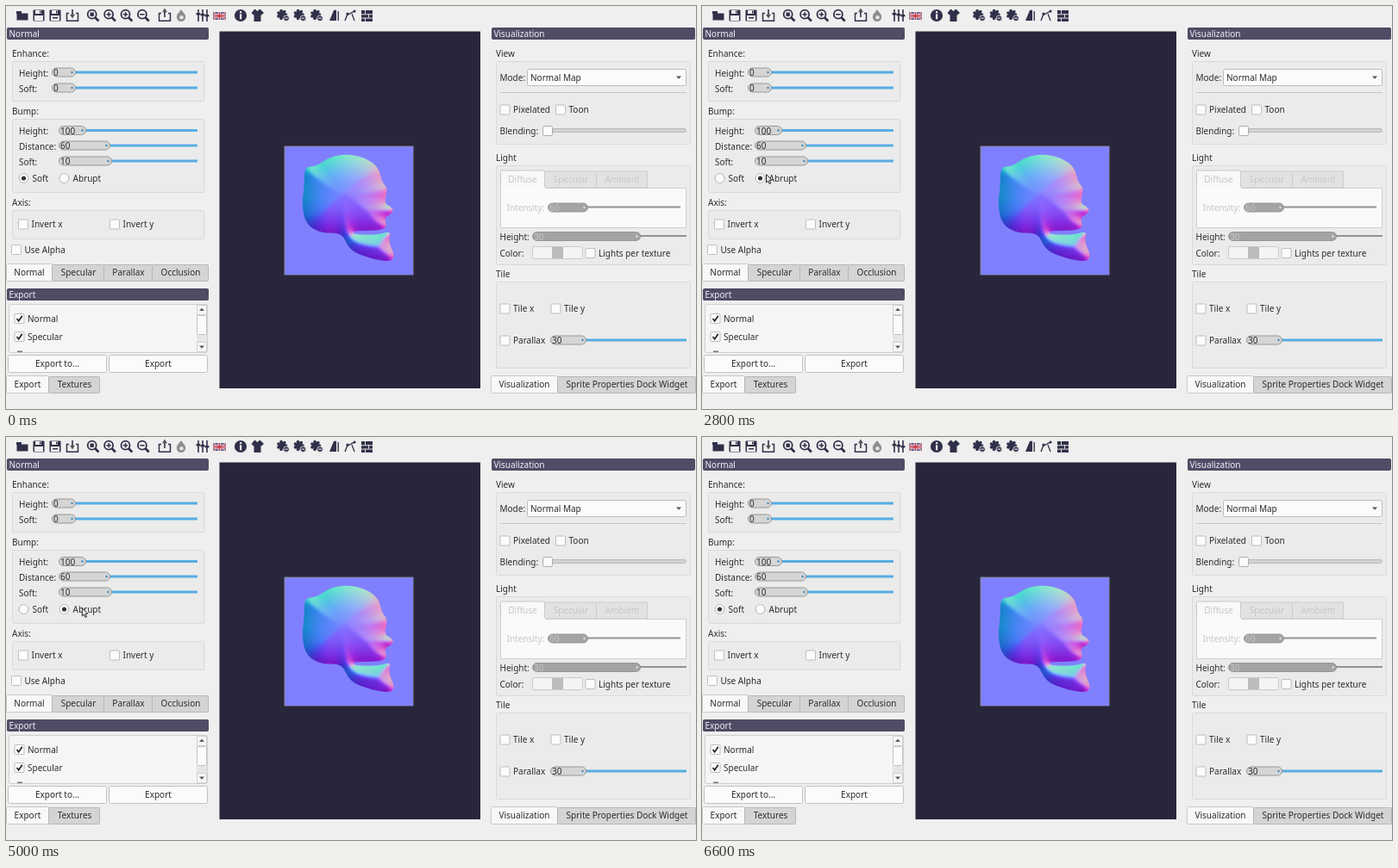
These frames come from a looping animation (800x468 px, 7.4 s). An HTML page with a canvas:

```html
<!DOCTYPE html>
<html lang="en">
<head>
<meta charset="utf-8">
<title>Normal map editor</title>
<style>
html, body { margin: 0; width: 100%; height: 100%; overflow: hidden; background: #efefef; }
canvas { display: block; }
</style>
</head>
<body>
<canvas id="stage" width="800" height="468"></canvas>
<script>
const LOOP = 7400, STEP = 100;
const INK = '#2c2c30', ICON = '#30304a', BLUE = '#57ade3', DIM = '#c6c6c6', BACK = '#efefef';
const stage = document.getElementById('stage').getContext('2d');
let g = stage;

// ---------- basic helpers ----------
function box(x, y, w, h, fill, line, r = 0) {
  g.beginPath();
  g.roundRect(x + .5, y + .5, w - 1, h - 1, r);
  if (fill) { g.fillStyle = fill; g.fill(); }
  if (line) { g.strokeStyle = line; g.lineWidth = 1; g.stroke(); }
}
function rect(x, y, w, h, fill) { g.fillStyle = fill; g.fillRect(x, y, w, h); }
function text(s, x, y, color = INK, align = 'left') {
  g.font = '10px "Noto Sans", sans-serif';
  g.textAlign = align;
  g.fillStyle = color;
  g.fillText(s, x, y + 3.6);
}
function trace(pts) {
  g.beginPath();
  pts.forEach(([x, y]) => g.lineTo(x, y));
}
function poly(pts, fill, line) {
  trace(pts);
  g.closePath();
  g.fillStyle = fill; g.fill();
  if (line) { g.strokeStyle = line; g.lineWidth = 1; g.stroke(); }
}
function line(pts, color, width = 1) {
  trace(pts);
  g.strokeStyle = color; g.lineWidth = width; g.stroke();
}
function disc(x, y, r, fill, stroke, width = 1) {
  g.beginPath(); g.arc(x, y, r, 0, 7);
  g.fillStyle = fill; g.fill();
  if (stroke) { g.strokeStyle = stroke; g.lineWidth = width; g.stroke(); }
}

// ---------- widgets ----------
function title(s, x, y, w) {
  box(x + 1, y + 1, w - 2, 14, '#4f4d66', '#4a4861', 1);
  text(s, x + 3.5, y + 8, '#f2f2f5');
}
function group(name, x, y, r, b) {
  text(name, x, y - 9);
  box(x, y, r - x, b - y, '#ebebeb', '#d9d9d9', 1);
}
function slider(value, x, knob, end, y, on = true) {
  rect(knob - 2, y - 1.5, end - knob + 2, on ? 3 : 2, on ? BLUE : '#929292');
  box(x, y - 5.5, knob - x, 11, on ? '#d5d5d5' : '#a4a4a4', '#979797', 5);
  text(value, x + 2, y + .7, on ? INK : '#c4c4c4');
  disc(knob - 4.5, y, 1.2, on ? '#3f87b8' : '#dedede');
}
function field(label, value, x, knob, y) {
  text(label, 15, y + 1);
  slider(value, x, knob, 222, y);
}
function check(s, x, y, on) {
  box(x, y - 6, 12, 12, '#fcfcfc', '#bdbdbd', 1);
  if (on) line([[x + 3, y], [x + 5.2, y + 2.8], [x + 9.3, y - 3.3]], '#222', 1.7);
  text(s, x + 15.5, y);
}
function radio(s, x, y, on) {
  disc(x, y, 5.4, '#fcfcfc', '#b5b5b5');
  if (on) disc(x, y, 2.6, '#333338');
  text(s, x + 10, y);
}
function tabs(names, x, y, color = INK) {
  const dim = color !== INK;
  names.forEach((s, i) => {
    text('', 0, 0);
    const w = Math.round(g.measureText(s).width + 19);
    if (i) box(x - 1, y + 1, w + 1, 20, dim ? '#e2e2e2' : '#d4d4d4', dim ? '#ccc' : '#b7b7b7', 1);
    else box(x, y, w, 21, '#f8f8f8', '#c8c8c8', 1);
    text(s, x + w / 2, y + 10.5, color, 'center');
    x += w;
  });
}
function button(s, x) {
  box(x, 405, 115, 21, '#fbfbfb', '#c1c1c1', 2);
  text(s, x + 57.5, 415.3, INK, 'center');
}
const arrow = (x, y, d) => poly([[x - 3, y - d * 1.5], [x + 3, y - d * 1.5], [x, y + d * 1.7]], '#555');

// ---------- toolbar ----------
function disk(x) {
  box(x - 7, 4, 14, 14, ICON, null, 1);
  rect(x - 4, 5, 7, 4, BACK);
  rect(x + 1, 5.5, 1.5, 3, ICON);
  rect(x - 5, 11, 10, 6, BACK);
}
function lens(x, mark) {
  line([[x + 2, 13], [x + 6.5, 17.5]], ICON, 2.6);
  disc(x - 1.3, 9.7, 5, BACK, ICON, 1.8);
  if (mark === 'fit') return rect(x - 3.5, 7.5, 4.4, 4.4, ICON);
  rect(x - 4, 9, 5.4, 1.5, ICON);
  if (mark !== '-') rect(x - 2, 7, 1.5, 5.4, ICON);
}
function tray(x, tip) {
  line([[x - 4, 8.5], [x - 6.5, 8.5], [x - 6.5, 17.2], [x + 6.5, 17.2], [x + 6.5, 8.5], [x + 4, 8.5]], ICON, 1.5);
  rect(x - .8, 4, 1.6, 9, ICON);
  arrow(x, tip > 8 ? 12 : 5, tip > 8 ? 1.5 : -1.5);
}
function splat(x) {
  for (let i = 0; i < 7; i++) disc(x - 1 + 4.5 * Math.cos(i * .9), 10 + 4.5 * Math.sin(i * .9), 1.8, ICON);
  disc(x - 1, 10, 4.2, ICON);
  disc(x + 4, 14.2, 3.3, ICON, BACK, .8);
  rect(x + 2.2, 13.6, 3.6, 1.1, BACK);
}
function flag(x, y) {
  rect(x, y, 15, 9, '#34437e');
  for (const [color, w] of [['#f4f4f4', 1.8], ['#c63c50', .9]]) {
    line([[x, y], [x + 15, y + 9]], color, w);
    line([[x + 15, y], [x, y + 9]], color, w);
    rect(x, y + 4.5 - w, 15, 2 * w, color);
    rect(x + 7.5 - w, y, 2 * w, 9, color);
  }
}
function toolbar() {
  rect(12, 6, 6, 3, ICON);
  box(12, 8, 14, 9, ICON);
  disk(38); disk(57);
  rect(54, 13, 6, 1.5, ICON);
  tray(77, 14);
  ['fit', '1', '+', '-'].forEach((mark, i) => lens(101 + i * 19.4, mark));
  tray(184, 3);
  disc(203, 12.8, 5.2, '#8d8d92');
  poly([[198.5, 10], [203, 4], [207.5, 10]], '#8d8d92');
  disc(203.5, 13.3, 2.2, '#e7e7e7');
  for (let i = -1; i < 2; i++) {
    rect(227.2 + i * 5, 4, 1.6, 14, ICON);
    rect(225.6 + i * 5, 9 + i, 4.8, 2.4, ICON);
  }
  flag(240, 7);
  disc(272, 11, 7.1, ICON);
  rect(271, 6, 2.2, 2.2, BACK); rect(271, 9.3, 2.2, 6, BACK);
  rect(287.5, 4.5, 8, 13.5, ICON);
  poly([[288, 4], [295, 4], [299, 8], [296, 10.5], [287, 10.5], [284.5, 8]], ICON);
  disc(291.5, 4, 1.8, BACK);
  for (let i = 0; i < 3; i++) splat(321 + i * 19.5);
  poly([[375, 17], [380, 5], [383, 4.5], [383, 17]], ICON);
  rect(384.5, 6, 1.4, 11, ICON);
  line([[393, 17], [395.5, 10.5], [404, 6]], ICON, 1.4);
  disc(396, 9, 1.6, ICON); disc(404, 6, 1.6, ICON);
  line([[401, 9], [404, 17]], ICON, 1.3);
  rect(412, 5, 13, 13, ICON);
  for (let r = 0; r < 3; r++) {
    if (r) rect(412, 5 + r * 4.3, 13, .9, BACK);
    rect(416 + (r % 2) * 4, 5 + r * 4.3, .9, 4.3, BACK);
  }
}

// ---------- panels ----------
function leftPanel() {
  title('Normal', 0, 24, 236);
  group('Enhance:', 7, 64, 230, 111);
  field('Height:', '0', 53, 81, 77);
  field('Soft:', '0', 53, 81, 95);
  group('Bump:', 7, 131, 230, 217);
  field('Height:', '100', 61, 93, 144.5);
  field('Distance:', '60', 61, 121, 162);
  field('Soft:', '10', 61, 123, 180);
  group('Axis:', 7, 237, 230, 271);
  check('Invert x', 14, 253.5); check('Invert y', 120, 253.5);
  check('Use Alpha', 6, 283);
  tabs(['Normal', 'Specular', 'Parallax', 'Occlusion'], 0, 299);

  title('Export', 0, 327, 236);
  box(3, 346, 231, 57, '#f5f5f5', '#cfcfcf', 1);
  check('Normal', 9.5, 363, true);
  check('Specular', 9.5, 384, true);
  rect(13, 400.5, 6, 1.5, '#77777a');
  rect(221, 347, 12, 55, '#e6e6e6');
  box(221, 347, 12, 12, '#f6f6f6', '#d0d0d0');
  box(221, 359, 12, 23, '#fafafa', '#c4c4c4', 1);
  box(221, 390, 12, 12, '#f6f6f6', '#d0d0d0');
  arrow(227, 352.5, -1); arrow(227, 396, 1);
  button('Export to...', 2); button('Export', 119);
  tabs(['Export', 'Textures'], 0, 429);
}
function rightPanel() {
  title('Visualization', 562, 24, 238);
  group('View', 568, 64, 794, 161);
  text('Mode:', 572.5, 83);
  box(604, 73, 185, 20, '#fbfbfb', '#bcbcbc', 2);
  text('Normal Map', 608, 83); arrow(780, 83, 1);
  rect(573, 100, 216, 1, '#c6c6c6');
  check('Pixelated', 572.5, 120.5); check('Toon', 637, 120.5);
  text('Blending:', 572.5, 145.5);
  box(628, 142, 161, 5, '#d2d2d2', '#bababa', 2);
  box(622, 139, 12, 12, '#fcfcfc', '#aaa', 2);

  group('Light', 568, 185, 794, 301);
  box(573, 211, 216, 47, '#fafafa', '#cfcfcf');
  tabs(['Diffuse', 'Specular', 'Ambient'], 573, 190.5, DIM);
  rect(574, 210, 51, 3, '#fafafa');
  text('Intensity:', 580.5, 234.5, DIM);
  slider('60', 628, 675, 782, 234, false);
  text('Height:', 572.5, 268.5);
  slider('30', 610, 736, 789, 267.5, false);
  text('Color:', 572.5, 287);
  box(610, 279, 59, 15, '#f4f4f4', '#c9c9c9', 2);
  rect(633, 280, 13, 13, '#bcbcbc');
  check('Lights per texture', 671.5, 287);

  group('Tile', 568, 320, 794, 421);
  check('Tile x', 572.5, 351.5); check('Tile y', 631.5, 351.5);
  check('Parallax', 572.5, 388.5);
  slider('30', 631, 673, 789, 388);
  tabs(['Visualization', 'Sprite Properties Dock Widget'], 562, 429);
}

// ---------- skull, lit as a normal map ----------
const OX = 323, OY = 163, SIZE = 150;
// control points, rounded off by quadratic curves
const knots = [
  [346, 187], [360, 186], [374, 176], [394, 171.5], [416, 176], [432, 187], [436, 205],
  [443, 212], [438, 229], [448, 234], [449, 240], [438, 246], [442, 256], [434, 261],
  [403, 261], [403, 265], [430, 266], [447, 261], [443, 273], [451, 290], [446, 297],
  [425, 294], [398, 284], [390, 263], [366, 264], [348, 254], [343, 232], [346, 206]
];
const skull = knots.flatMap((p, i) => {
  const a = knots.at(i - 1), b = knots[(i + 1) % knots.length];
  return [0, .25, .5, .75].map(t => [0, 1].map(k =>
    (1 - t) ** 2 * (a[k] + p[k]) / 2 + 2 * t * (1 - t) * p[k] + t * t * (p[k] + b[k]) / 2 - [OX, OY][k]));
});

// signed distance to the outline, positive inside
function depth(x, y) {
  let best = 1e9, hit = false;
  skull.forEach(([ax, ay], i) => {
    const [bx, by] = skull[(i + 1) % skull.length], dx = bx - ax, dy = by - ay;
    const t = Math.max(0, Math.min(1, ((x - ax) * dx + (y - ay) * dy) / (dx * dx + dy * dy)));
    best = Math.min(best, Math.hypot(x - ax - t * dx, y - ay - t * dy));
    if ((ay > y) !== (by > y) && x < dx * (y - ay) / dy + ax) hit = !hit;
  });
  return hit ? best : -best;
}
const clamp = v => Math.max(0, Math.min(SIZE - 1, v));
function blur(src, r) {
  const pass = (a, step) => a.map((_, i) => {
    const pos = step === 1 ? i % SIZE : Math.floor(i / SIZE);
    let sum = 0;
    for (let k = -r; k <= r; k++) sum += a[i + step * (clamp(pos + k) - pos)];
    return sum / (2 * r + 1);
  });
  return pass(pass(src, 1), SIZE);
}
const depths = Float32Array.from({ length: SIZE * SIZE }, (_, i) => depth(i % SIZE + .5, Math.floor(i / SIZE) + .5));

function normalMap(profile, r) {
  const c = document.createElement('canvas');
  c.width = c.height = SIZE;
  const ctx = c.getContext('2d'), img = ctx.createImageData(SIZE, SIZE);
  const h = blur(blur(depths.map(profile), r), r);
  const at = (x, y) => h[clamp(y) * SIZE + clamp(x)];
  for (let y = 0; y < SIZE; y++) for (let x = 0; x < SIZE; x++) {
    const nx = (at(x - 1, y) - at(x + 1, y)) / 2, ny = (at(x, y + 1) - at(x, y - 1)) / 2;
    const k = 127 / Math.hypot(nx, ny, 1);
    img.data.set([128 + nx * k, 128 + ny * k, 128 + k, 255], (y * SIZE + x) * 4);
  }
  ctx.putImageData(img, 0, 0);
  return c;
}
const maps = {
  soft: normalMap(d => d < 0 ? 1.5 * d : 27 * (1 - Math.exp(-d / 18)), 2),
  abrupt: normalMap(d => .72 * Math.min(d, 36), 2)
};

function sprite(map) {
  rect(OX - .5, OY - .5, SIZE, SIZE, '#85858f');
  g.save();
  g.translate(OX, OY);
  poly(skull.slice(0, 0).concat([[.5, .5], [149, .5], [149, 149], [.5, 149]]), '#8080ff');
  poly(skull, '#8080ff');
  g.clip();
  g.drawImage(map, 0, 0);
  g.restore();
}

// ---------- pointer and timeline ----------
const smooth = k => k * k * (3 - 2 * k), rush = k => 1 - (1 - k) ** 5;
const path = [
  [1000, 783, 330], [1200, 615, 228], [2100, 122, 186, rush], [2700, 75, 195],
  [3700, 47, 198], [4200, 47, 198], [4900, 88, 198], [5200, 88, 198], [6200, 28, 198], [6500, 690, 436]
];
function pointer(t) {
  const i = path.findIndex(p => p[0] > t);
  if (i < 1) return;
  const [t0, x0, y0] = path[i - 1], [t1, x1, y1, ease = smooth] = path[i];
  const k = ease((t - t0) / (t1 - t0));
  g.save();
  g.translate(x0 + (x1 - x0) * k, y0 + (y1 - y0) * k);
  poly([[.3, .5], [.3, 10], [2.4, 8], [4, 11.5], [5.6, 10.8], [4, 7.4], [6.8, 7.2]], '#e9e9e9', '#27272b');
  g.restore();
}

const ui = document.createElement('canvas');
ui.width = 800; ui.height = 468;
g = ui.getContext('2d');
rect(0, 0, 800, 468, BACK);
toolbar();
leftPanel();
rightPanel();
rect(247.5, 29.5, 302.5, 414.5, '#28263a');
g = stage;

// the picture follows each click after a short delay
const LAG = 200;
const abruptAt = t => (t >= 2700 && t < 3800) || (t >= 4900 && t < 6100);

function draw(t) {
  g.drawImage(ui, 0, 0);
  radio('Soft', 20.5, 200, !abruptAt(t));
  radio('Abrupt', 67.5, 200, abruptAt(t));
  sprite(abruptAt(t - LAG) ? maps.abrupt : maps.soft);
  pointer(t);
}
const start = performance.now();
let last = -1;
function tick() {
  const t = Math.floor((performance.now() - start) % LOOP / STEP) * STEP;
  if (t !== last) draw(last = t);
  requestAnimationFrame(tick);
}
tick();
</script>
</body>
</html>
```
